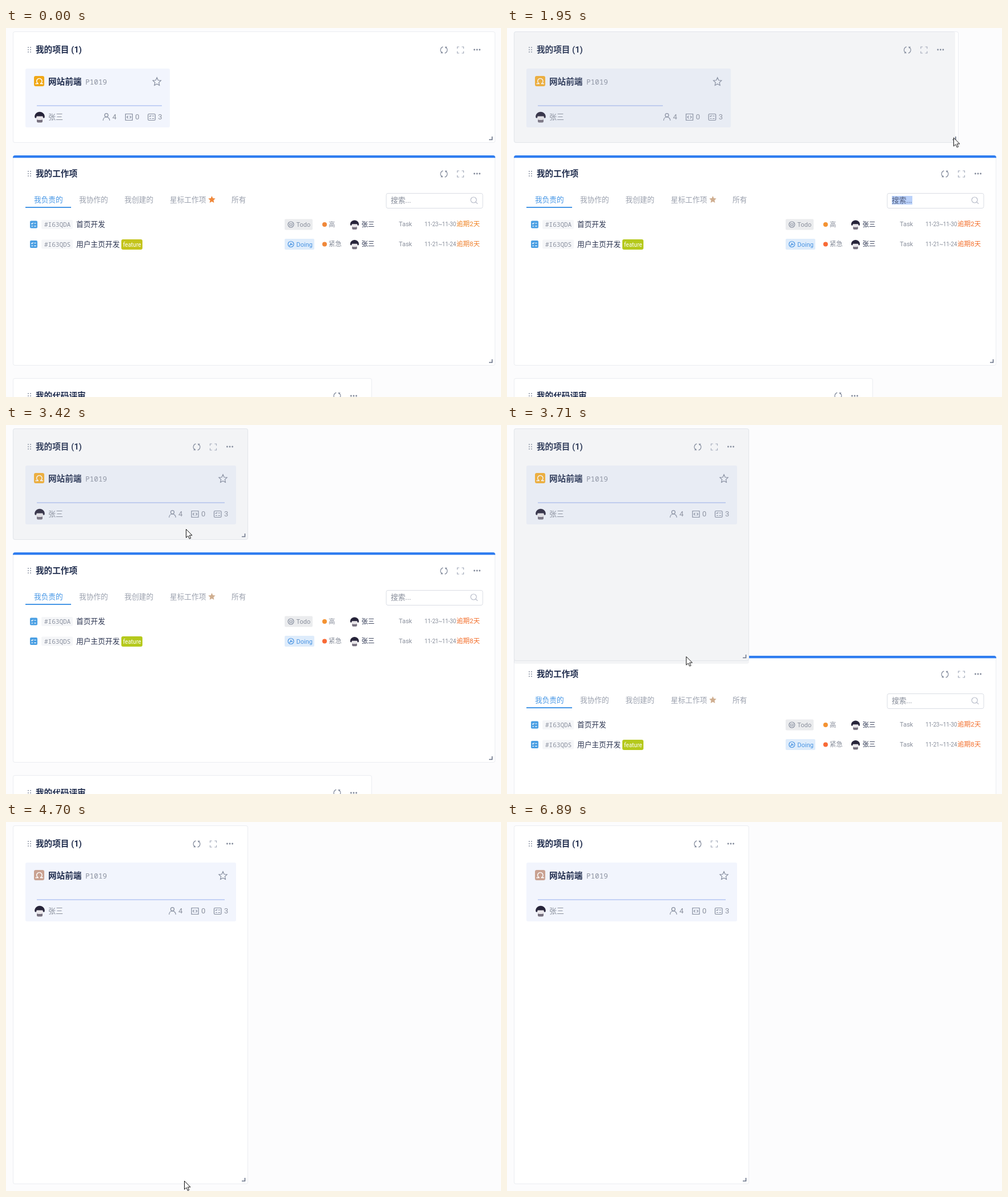
These frames come from a looping animation (867x646 px, 7.53 s). An HTML page:

```html
<!DOCTYPE html>
<html lang="zh-CN">
<head>
<meta charset="utf-8">
<title>工作台</title>
<style>
html, body { margin: 0; width: 100%; height: 100%; overflow: hidden; background: #fcfcfd; }
#stage {
  position: relative; width: 867px; height: 646px; overflow: hidden; background: #fcfcfd;
  font-family: Roboto, "Noto Sans CJK SC", "Noto Sans CJK", sans-serif;
  animation: tint 7530ms step-end infinite;
}
svg { display: block; overflow: visible; }
.card {
  position: absolute; left: 12px; width: 845px; box-sizing: border-box; overflow: hidden;
  background: #fff; border-radius: 4px; box-shadow: inset 0 0 0 1px #ebedf1;
}
.card > svg { position: absolute; inset: 0; width: 100%; height: 100%; }
#projects { top: 6px; height: 195px; animation: resize 7530ms infinite; }
#work { top: 223px; height: 368px; animation: push 7530ms infinite; }
#review { top: 613px; width: 629px; height: 200px; animation: push 7530ms infinite; }
#grid {
  position: absolute; left: 22px; right: 21px; top: 65px; height: 103px;
  display: grid; gap: 21px; grid-template-columns: repeat(auto-fill, minmax(240px, 1fr));
}
#grid > div { background: #f2f5fd; border-radius: 3px; }
#grid svg { width: 100%; height: 103px; }
#line { width: 219px; animation: line 7530ms step-end infinite; }
#ghost {
  position: absolute; left: 12px; top: 6px; border-radius: 4px; background: rgba(169, 177, 191, .14);
  animation: ghost 7530ms infinite, dragging 7530ms step-end infinite;
}
#mark { animation: mark 7530ms step-end infinite; }
#pointer { position: absolute; left: 0; top: 0; width: 1px; height: 1px; animation: move 7530ms infinite; }
#arrow { animation: arrow 7530ms step-end infinite; }
#sizer { animation: sizer 7530ms step-end infinite; }

.title { font-size: 14.6px; font-weight: 700; fill: #1f2c4d; }
.mono { font-family: "Noto Sans Mono", monospace; fill: #8c92a0; }
.tab { font-size: 12.7px; fill: #9ba1ae; }
.name { font-size: 12.7px; fill: #2b3450; }
.mid { font-size: 11.5px; }
.small { font-size: 11px; }
.date { font-size: 10px; letter-spacing: -.2px; }
.grey { fill: #8a909d; }
.stat { font-size: 13px; fill: #8a909d; }
.stroke { fill: none; stroke: #848c9d; stroke-width: 1.2; }
.pale { stroke: #a3aaba; }
.corner { fill: none; stroke: #667085; stroke-width: 1.6; }

@keyframes tint {
  0% { --star: #f0883a; --high: #f0883a; --urgent: #f0883a; --late: #ef8220; --later: #ef8230; --tag: #c4c41c; --logo: #f0a818; }
  8% { --star: #d9ae8c; --high: #d9ae8c; --urgent: #ee7233; --late: #8a5a44; --later: #e8782e; --tag: #b5c91c; --logo: #f0a818; }
  25.89%, 45.41% { --star: #cfae90; --high: #f49333; --urgent: #f86a36; --late: #f36f2c; --later: #f36f2c; --tag: #b5c91c; --logo: #f6ae2d; }
  62.41%, 100% { --star: #cfae90; --high: #f49333; --urgent: #f86a36; --late: #f36f2c; --later: #f36f2c; --tag: #b5c91c; --logo: #c9a292; }
}
@keyframes resize {
  0%, 25.89% { width: 845px; height: 195px; animation-timing-function: steps(6, start); }
  32.07% { width: 451px; height: 195px; animation-timing-function: steps(4, start); }
  36.32% { width: 412px; height: 195px; animation-timing-function: step-end; }
  45.41% { width: 412px; height: 195px; animation-timing-function: steps(7, jump-none); }
  53.18% { width: 412px; height: 619px; animation-timing-function: step-end; }
  62.41%, 100% { width: 412px; height: 628px; }
}
@keyframes ghost {
  0%, 25.89% { width: 845px; height: 195px; animation-timing-function: steps(6, start); }
  32.07% { width: 412px; height: 195px; animation-timing-function: step-end; }
  45.41% { width: 412px; height: 195px; animation-timing-function: steps(7, jump-none); }
  53.18%, 100% { width: 412px; height: 628px; }
}
@keyframes dragging {
  0% { visibility: hidden; }
  25.89% { visibility: visible; }
  62.41%, 100% { visibility: hidden; }
}
@keyframes push {
  0% { transform: none; animation-timing-function: step-end; }
  45.41% { transform: translateY(0); animation-timing-function: steps(7, jump-none); }
  53.18% { transform: translateY(362px); animation-timing-function: step-end; }
  53.2% { transform: translateY(415px); animation-timing-function: step-end; }
  54.15%, 100% { transform: translateY(440px); }
}
@keyframes line {
  0% { width: 219px; }
  30%, 100% { width: 329px; }
}
@keyframes mark {
  0% { visibility: hidden; }
  25.89% { visibility: visible; }
  35.26%, 100% { visibility: hidden; }
}
@keyframes move {
  0%, 3.05% { transform: translate(715px, 400px); animation-timing-function: steps(10, jump-none); }
  13.41% { transform: translate(848px, 210px); animation-timing-function: step-end; }
  14.34%, 25.89% { transform: translate(852px, 201px); animation-timing-function: steps(6, start); }
  32.07% { transform: translate(431px, 145px); animation-timing-function: steps(4, start); }
  36.32% { transform: translate(315px, 182px); animation-timing-function: step-end; }
  45.41% { transform: translate(315px, 182px); animation-timing-function: steps(7, jump-none); }
  53.18% { transform: translate(312px, 628px); animation-timing-function: step-end; }
  75.16% { transform: translate(451px, 597px); animation-timing-function: steps(5, jump-none); }
  80.14% { transform: translate(708px, 557px); animation-timing-function: step-end; }
  82.33% { transform: translate(708px, 557px); animation-timing-function: steps(4, start); }
  86.4% { transform: translate(741px, 595px); animation-timing-function: step-end; }
  88.44% { transform: translate(741px, 595px); animation-timing-function: steps(3, start); }
  91.5%, 100% { transform: translate(817px, 643px); }
}
@keyframes arrow {
  0% { visibility: hidden; }
  3.05% { visibility: visible; }
  14.34% { visibility: hidden; }
  25.89% { visibility: visible; }
  91.5%, 100% { visibility: hidden; }
}
@keyframes sizer {
  0% { visibility: hidden; }
  14.34% { visibility: visible; }
  25.89%, 100% { visibility: hidden; }
}
</style>
</head>
<body>
<svg width="0" height="0" style="position:absolute">
  <defs>
    <path id="grip" d="M-2-4h0M2-4h0M-2 0h0M2 0h0M-2 4h0M2 4h0" stroke="#8a92a3" stroke-width="2" stroke-linecap="round"/>
    <g id="refresh">
      <path class="stroke" stroke-width="1.4" d="M-3.6 4.6A5.8 5.8 0 0 1-1.6-5.6M3.6-4.6A5.8 5.8 0 0 1 1.6 5.6"/>
      <path fill="#848c9d" d="M1.6-5.8h4.2l-2.6 3.4zM-1.6 5.8h-4.2l2.6-3.4z"/>
    </g>
    <path id="expand" class="stroke pale" d="M-5.5-2.3v-3.2h3.2M2.3-5.5h3.2v3.2M5.5 2.3v3.2H2.3M-2.3 5.5h-3.2V2.3"/>
    <path id="dots" d="M-4.6 0h0M0 0h0M4.6 0h0" stroke="#7f8798" stroke-width="2.8" stroke-linecap="round"/>
    <path id="corner" class="corner" d="M-11-5.5h5.5V-11"/>
    <path id="star" d="M0-7.2 2.1-2.5 7.1-2 3.4 1.4 4.4 6.4 0 3.9-4.4 6.4-3.4 1.4-7.1-2-2.1-2.5z"/>
    <g id="avatar">
      <rect x="-5" y="3" width="10" height="6.5" rx="2" fill="#77717f"/>
      <rect x="-6" y="-4" width="12" height="9" rx="4" fill="#e9e6ea"/>
      <path fill="#27243a" d="M-8.5 1C-10-5-5-9.3 0-9.3S10-5 8.5 1Q6 3.5 5.4-1.5H-5.4Q-6 3.5-8.5 1z"/>
    </g>
    <g id="item">
      <rect x="42" y="-6.5" width="13" height="13" rx="2" fill="#4a9fe3"/>
      <path fill="none" stroke="#fff" stroke-width="1.2" d="M44.3-2l1.2 1.2 2-2.2M49.3-2h3.4M44.5 2.8h2.6M49.3 2.8h3.4"/>
      <rect x="62" y="-8" width="55" height="16" rx="2" fill="#f5f6f8"/>
      <use href="#avatar" transform="translate(610.5 .5) scale(.86)"/>
      <text class="name mid" x="622.5" y="3.8">张三</text>
      <text class="grey small" x="688" y="3.4">Task</text>
    </g>
  </defs>
</svg>

<div id="stage">
  <div class="card" id="review">
    <svg>
      <use href="#grip" x="29" y="31"/>
      <text class="title" x="40" y="36">我的代码评审</text>
      <svg x="100%"><use href="#refresh" x="-61" y="31"/><use href="#dots" x="-32" y="31"/></svg>
    </svg>
  </div>

  <div class="card" id="work">
    <svg><g transform="translate(-12 -223)">
      <rect x="12" y="223" width="845" height="4.3" fill="#2f7df0"/>
      <use href="#grip" x="41" y="255"/>
      <text class="title" x="52" y="260.3">我的工作项</text>
      <use href="#refresh" x="767" y="255.5"/><use href="#expand" x="796" y="255.5"/><use href="#dots" x="825" y="255"/>

      <text class="tab" x="49" y="304.6" style="fill:#4797e6">我负责的</text>
      <rect x="34" y="313" width="80" height="2" fill="#4797e6"/>
      <text class="tab" x="128" y="304.6">我协作的</text>
      <text class="tab" x="207.5" y="304.6">我创建的</text>
      <text class="tab" x="287" y="304.6">星标工作项</text>
      <use href="#star" transform="translate(360.5 300.3) scale(.88)" style="fill:var(--star)"/>
      <text class="tab" x="395" y="304.6">所有</text>

      <rect x="666" y="289.5" width="169" height="26" rx="3" fill="#fff" stroke="#dadde4"/>
      <text class="tab" x="674" y="306" style="fill:#868c99">搜索...</text>
      <g id="mark">
        <rect x="674" y="294" width="36" height="15" fill="#bad1fa"/>
        <text class="tab" x="674" y="306" style="fill:#4d5a7c">搜索...</text>
      </g>
      <path class="stroke" style="stroke:#b8bdca" d="M824 301a5 5 0 1 1-10 0a5 5 0 0 1 10 0M822.7 304.6l3.3 3.2"/>

      <g transform="translate(0 344)">
        <use href="#item"/>
        <text class="mono small" x="67" y="4.2">#I63QDA</text>
        <text class="name" x="123" y="4.4">首页开发</text>
        <rect x="488" y="-9.5" width="49" height="19" rx="2" fill="#ebecee"/>
        <circle class="stroke" cx="499" cy="0" r="5"/>
        <path class="stroke" stroke-width="1" d="M497-2v4M499-2.4v1.4M501-2v4M497.5 2h3"/>
        <text class="small grey" x="508.5" y="4">Todo</text>
        <circle cx="558" cy="0" r="4" style="fill:var(--high)"/>
        <text class="mid grey" x="565" y="3.8">高</text>
        <text class="date grey" x="733" y="3.2">11-23~11-30</text>
        <text class="mid" x="789" y="3.4" style="fill:var(--late)">逾期2天</text>
      </g>
      <g transform="translate(0 378.5)">
        <use href="#item"/>
        <text class="mono small" x="67" y="4.2">#I63QDS</text>
        <text class="name" x="123" y="4.4">用户主页开发</text>
        <rect x="202" y="-8.5" width="37" height="18" rx="3" style="fill:var(--tag)"/>
        <text x="205" y="4" font-size="10" fill="#fff">feature</text>
        <rect x="488" y="-9.5" width="52" height="19" rx="2" fill="#deecfb"/>
        <g style="--c:#4a94e2">
          <circle class="stroke" style="stroke:var(--c)" cx="499" cy="0" r="5"/>
          <path fill="none" stroke="#4a94e2" stroke-width="1.4" d="M496.5 2.5l3-3M499-2.5v3h3"/>
        </g>
        <text class="small" x="508.5" y="4" fill="#4a94e2">Doing</text>
        <circle cx="558" cy="0" r="4" style="fill:var(--urgent)"/>
        <text class="mid grey" x="565" y="3.8">紧急</text>
        <text class="date grey" x="733" y="3.2">11-21~11-24</text>
        <text class="mid" x="789" y="3.4" style="fill:var(--later)">逾期8天</text>
      </g>
      <use href="#corner" x="857" y="591"/>
    </g></svg>
  </div>

  <div class="card" id="projects">
    <svg>
      <use href="#grip" x="29" y="32"/>
      <text class="title" x="40" y="37.3">我的项目 (1)</text>
      <svg x="100%">
        <use href="#refresh" x="-90" y="32.5"/><use href="#expand" x="-61" y="32.5"/><use href="#dots" x="-32" y="32"/>
      </svg>
      <svg x="100%" y="100%"><use href="#corner"/></svg>
    </svg>
    <div id="grid"><div><svg>
      <rect x="15" y="13" width="18" height="18" rx="3" style="fill:var(--logo)"/>
      <path fill="none" stroke="#fff" stroke-width="1.4" d="M17.5 26.5h5.2A4.7 4.7 0 1 1 26 26.5h5"/>
      <text class="title" x="40" y="28.3">网站前端</text>
      <text class="mono" x="105" y="28.4" font-size="12.6">P1019</text>
      <rect id="line" x="20" y="64.2" height="1.7" fill="#bccbf6"/>
      <use href="#avatar" x="25" y="85"/>
      <text class="stat" x="40" y="89.3">张三</text>
      <svg x="100%">
        <use href="#star" class="stroke" x="-23" y="23"/>
        <path class="stroke" d="M-114.5 81.7a3 3 0 1 1 6 0a3 3 0 0 1-6 0M-117.3 91c0-8 11.600-8 11.600 0"/>
        <text class="stat" x="-101" y="89.300">4</text>
        <path class="stroke" d="M-78 79.500h12v11h-12zM-73.300 82.700l-2.200 2.300 2.200 2.300M-70.700 82.700l2.200 2.300-2.200 2.300"/>
        <text class="stat" x="-61" y="89.300">0</text>
        <rect class="stroke" x="-38.500" y="79.500" width="12.500" height="11" rx="1.500"/>
        <path class="stroke" d="M-36.300 82.800l1.200 1.200 2-2M-31.500 83h3.500M-36 87.500h2.800M-31.500 87.500h3.500"/>
        <text class="stat" x="-21" y="89.300">3</text>
      </svg>
    </svg></div></div>
  </div>

  <div id="ghost"></div>

  <svg id="pointer">
    <path id="arrow" fill="#fff" stroke="#111" stroke-linejoin="round" d="M.5.5v14.700l3.400-3.200 2.400 5.200 2.300-1-2.300-5.100h4.700z"/>
    <path id="sizer" fill="#fff" stroke="#111" stroke-linejoin="round" d="M-7.500-7.500h6l-2 2 7.500 7.500 2-2 1.500 7.500h-6l2-2-7.500-7.500-2 2z"/>
  </svg>
</div>
</body>
</html>
```
